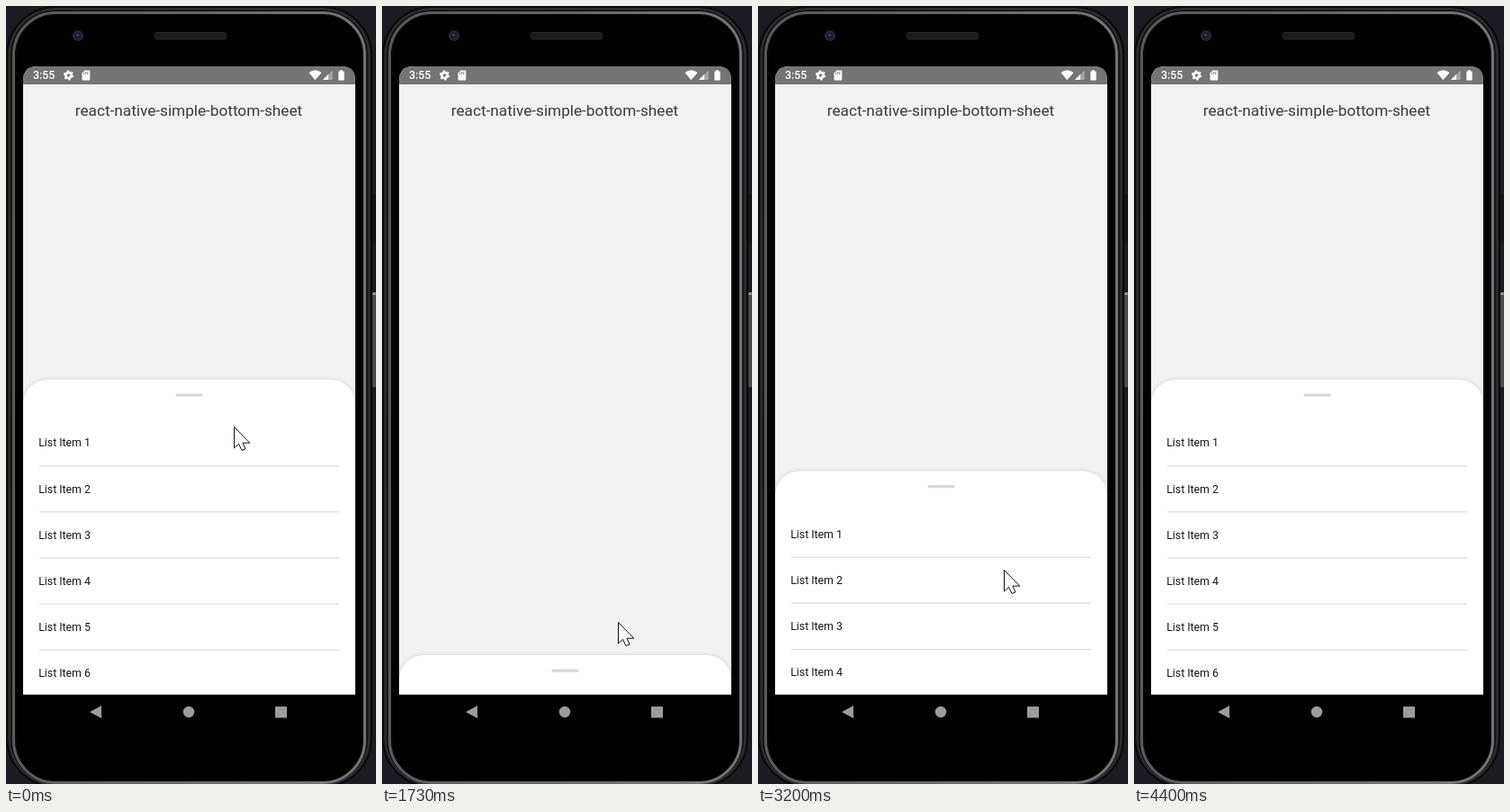
Recreate the animation shown at these times as an HTML page. Size 411 px wide and 864 px high, loop 4.87 s.

```html
<!DOCTYPE html>
<html lang="en">
<head>
<meta charset="utf-8">
<title>Bottom sheet demo</title>
<style>
  html, body { margin: 0; width: 100%; height: 100%; overflow: hidden; background: #1d1a24; }
  svg { display: block; width: 411px; height: 864px; font-family: Roboto, sans-serif; }
  .item { font-size: 12.3px; fill: #161616; }
</style>
</head>
<body>
<svg viewBox="0 0 411 864">
  <defs>
    <clipPath id="screen"><path d="M19 764.4V83Q19 67 35 67H372Q388 67 388 83V764.4Z"/></clipPath>
    <filter id="soft" x="-10%" y="-10%" width="120%" height="120%"><feGaussianBlur stdDeviation="2.5"/></filter>
    <linearGradient id="rim" x2="1" y2=".1">
      <stop offset="0" stop-color="#585858"/>
      <stop offset="1" stop-color="#747474"/>
    </linearGradient>
  </defs>

  <!-- surroundings and side buttons -->
  <rect width="411" height="864" fill="#1d1a24"/>
  <rect y="200" width="2" height="140" fill="#14182a"/>
  <rect y="458" width="1.2" height="112" fill="#9a9bd0"/>
  <rect x="406" y="210" width="5" height="54" fill="#151515"/>
  <rect x="407" y="318" width="4" height="105" fill="#4a4a4a"/>
  <rect x="407" y="318" width="4" height="3" fill="#8a8a8a"/>

  <!-- phone body -->
  <rect x="1" y="1" width="405" height="866" rx="54" fill="#242424" stroke="#0a0a0a" stroke-width="2"/>
  <rect x="4" y="3.5" width="399" height="861" rx="51" fill="#151515" stroke="#3b3b3b"/>
  <rect x="8.5" y="7.5" width="390" height="855" rx="47" fill="#090909" stroke="url(#rim)" stroke-width="3"/>
  <rect x="11.5" y="10.5" width="384" height="850" rx="44" fill="#010101"/>
  <circle cx="80" cy="33" r="6" fill="#25252c"/>
  <circle cx="80" cy="33" r="3.5" fill="#141a3c"/>
  <circle cx="79.5" cy="32.5" r="1.2" fill="#3c4a86"/>
  <rect x="165.5" y="29.5" width="79" height="7.5" rx="2" fill="#1b1b1b" stroke="#292929"/>

  <g clip-path="url(#screen)">
    <rect x="19" y="67" width="369" height="698" fill="#f1f1f1"/>
    <rect x="19" y="67" width="369" height="20" fill="#757575"/>
    <text x="203" y="122.3" font-size="17.2" text-anchor="middle" fill="#3b3b3b">react-native-simple-bottom-sheet</text>

    <!-- status bar -->
    <g fill="#fff">
      <text x="30" y="81.3" font-size="12.4" font-weight="500">3:55</text>
      <circle cx="69.5" cy="77" r="3.1" fill="none" stroke="#fff" stroke-width="2.6"/>
      <circle cx="69.5" cy="77" r="4.7" fill="none" stroke="#fff" stroke-width="1.8" stroke-dasharray="2.4 2.52"/>
      <path d="M87.5 71.5H92.5Q93.3 71.5 93.3 72.3V81.7Q93.3 82.5 92.5 82.5H85.3Q84.5 82.5 84.5 81.7V74.5Z"/>
      <path d="M86.7 74v2M88.7 73v3M90.7 73v3" stroke="#757575" stroke-width=".9"/>
      <path d="M336.5 74Q343.5 68.5 350.5 74L343.5 82.3Z"/>
      <path d="M362.5 71.5V82H352Z" opacity=".35"/>
      <path d="M358 76V82H352Z"/>
      <path d="M369.3 72.5H371V71.3H374V72.5H375.7V82.5H369.3Z"/>
    </g>

    <g id="sheet">
      <rect x="19" y="0" width="369" height="420" rx="27" opacity=".13" filter="url(#soft)"/>
      <rect x="19" y="0" width="369" height="420" rx="27" fill="#fff"/>
      <rect x="188.5" y="15.6" width="30" height="3.2" rx="1.5" fill="#d3dadc"/>
    </g>
  </g>

  <!-- navigation bar -->
  <g fill="#9d9d9d">
    <path d="M93 784L106 777V791Z"/>
    <circle cx="203" cy="784" r="6.2"/>
    <rect x="299" y="778" width="13" height="12.5" rx=".5"/>
  </g>

  <path id="cursor" d="M.5 .5V24L5.5 19.3L9 26.5L13 25L10 18.2H17.8Z" fill="#fff" stroke="#111"/>
</svg>
<script>
const LOOP = 4870, TICK = 1000 / 15;
const OPEN = 415, CLOSED = 721;
const sheet = document.getElementById('sheet');
const cursor = document.getElementById('cursor');

function add(tag, attrs, text) {
  const el = document.createElementNS('http://www.w3.org/2000/svg', tag);
  for (const key in attrs) el.setAttribute(key, attrs[key]);
  if (text) el.textContent = text;
  sheet.append(el);
}
for (let i = 0; i < 6; i++) {
  const y = i * 51.1;
  add('text', { class: 'item', x: 36.2, y: y + 74.4 }, `List Item ${i + 1}`);
  add('rect', { x: 37, y: y + 95.2, width: 333, height: 1.1, fill: '#dadada' });
}

// Pointer moves, times in ticks
const start = { x: 253, y: 467 };
const moves = [
  { from: 0, to: 4, x: 253, y: 426 },
  { from: 9, to: 11, x: 255, y: 520 },
  { from: 22, to: 26, x: 262, y: 684 },
  { from: 26, to: 29, x: 277, y: 752 },
  { from: 39, to: 41, x: 273, y: 626 },
  { from: 54, to: 63, x: 130, y: 844 },
  { from: 63, to: 66, x: 108, y: 870 }
];

// Share of a span covered at tick k, from 0 to 1
const progress = (k, from, to) => Math.min(1, Math.max(0, (k - from) / (to - from)));

// Quick start, long soft landing
const ease = p => 1 - (1 - p ** 1.65) ** 3.37;

function pointer(k) {
  let { x, y } = start;
  for (const m of moves) {
    const p = progress(k, m.from, m.to);
    x += (m.x - x) * p;
    y += (m.y - y) * p;
  }
  return [Math.round(x), Math.round(y)];
}

function place(el, x, y) {
  el.setAttribute('transform', `translate(${x} ${y})`);
}

function draw() {
  const time = performance.now() % LOOP;
  const k = Math.floor((time + 4) / TICK); // 15 updates a second, on times rounded to 10 ms
  const shut = ease(progress(k, 12, 23.5)) - ease(progress(k, 42, 55));
  place(sheet, 0, OPEN + (CLOSED - OPEN) * shut);
  place(cursor, ...pointer(k));
  requestAnimationFrame(draw);
}
draw();
</script>
</body>
</html>
```
